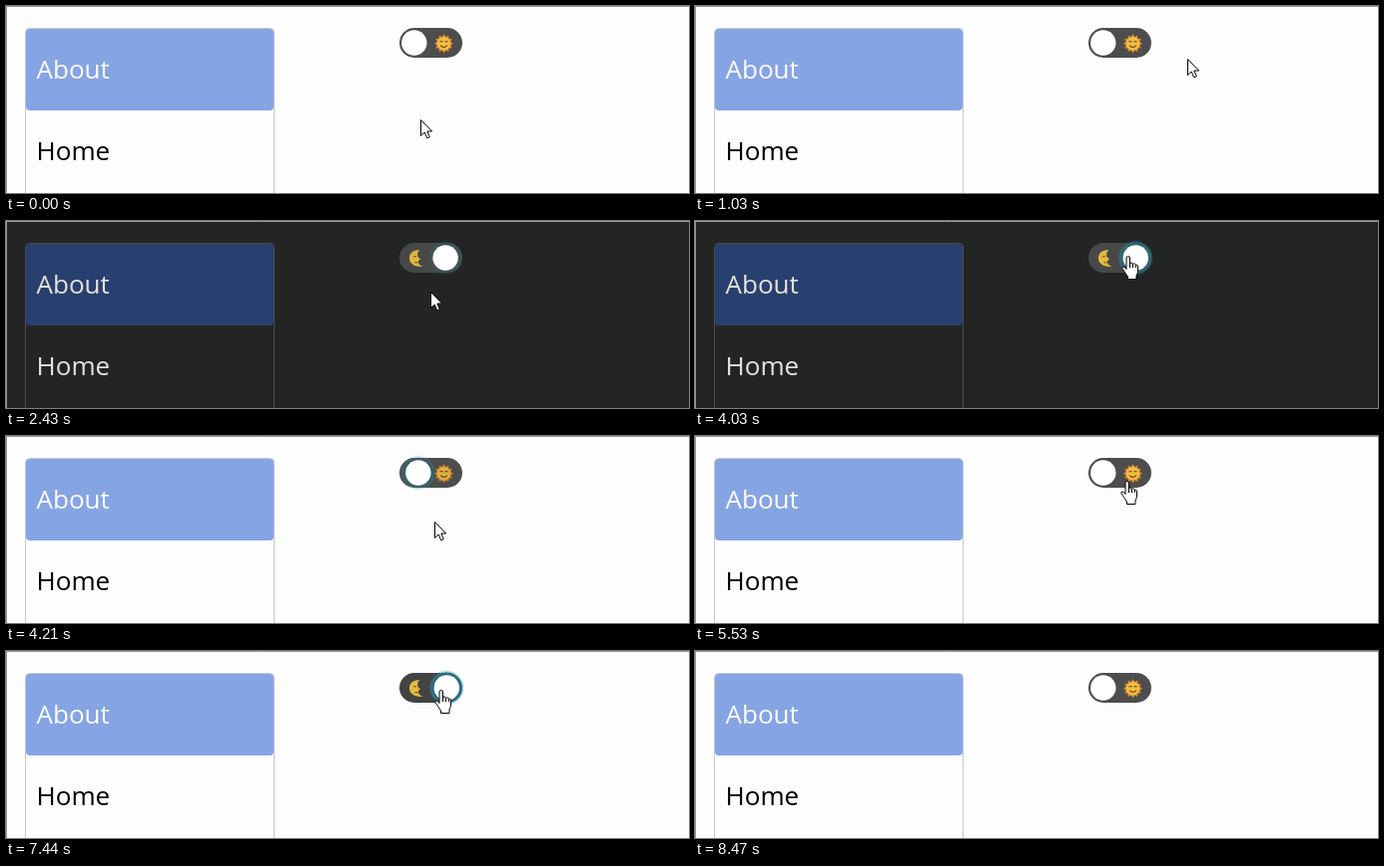
These frames come from a looping animation (684 px wide and 188 px high, 8.75 s). An HTML page:

```html
<!DOCTYPE html>
<html lang="en">
<head>
<meta charset="utf-8">
<title>Theme toggle</title>
<style>
  html, body { margin: 0; width: 100%; height: 100%; overflow: hidden; background: #fdfdfd; }
  svg { display: block; }
  text { font: 26px "Open Sans", "Noto Sans", sans-serif; }
</style>
</head>
<body>
<svg width="684" height="188" viewBox="0 0 684 188">
  <defs>
    <filter id="soft" x="-30%" y="-30%" width="160%" height="160%"><feGaussianBlur stdDeviation="1"/></filter>
  </defs>
  <rect id="page" width="684" height="188"/>
  <path d="M0 .5H684M.5 0V188" stroke="#969696"/>
  <rect id="list" x="19.5" y="22.5" width="249" height="200" rx="4" fill="none"/>
  <rect id="item" x="20" y="23" width="248" height="82" rx="4"/>
  <text id="about" x="30.5" y="73">About</text>
  <text id="home" x="30.5" y="155">Home</text>

  <rect id="track" x="394" y="22" width="63" height="30" rx="15"/>
  <g id="moon">
    <path d="M414.5 29C407 29 404 33 404 37.500S408 46.500 417.500 46C413.500 44 412.500 42 413 40L415 38.500L412.500 36C411.500 33 412.500 30.500 414.500 29Z" fill="#e3b93f"/>
    <path d="M408 35.500q1.500 1 2.800 0M409.500 41.500q1.500 1 3 0" fill="none" stroke="#5c4a22"/>
  </g>
  <g id="sun" transform="translate(438.500 37.700)">
    <path id="rays" fill="#e08a2c"/>
    <circle r="6.800" fill="#f2bd42"/>
    <path d="M-4-1.500q1.500-1.500 3 0M1-1.500q1.500-1.500 3 0M-3.500 2q3.500 3.500 7 0" fill="none" stroke="#66431f" stroke-width="1.100"/>
  </g>
  <g id="knob">
    <g id="ring" fill="none">
      <circle r="14.500" stroke="#3594ac" stroke-width="3" filter="url(#soft)"/>
      <circle r="14" stroke="#2b6c7c" stroke-width="2.500"/>
    </g>
    <circle r="12.700" fill="#fff"/>
  </g>

  <g id="cursor" fill="#fff" stroke="#000" stroke-linejoin="round">
    <path id="arrow" d="M.5.5V16.500L4.200 13L6.700 18.800L9.300 17.700L6.900 12H11.700Z"/>
    <g id="hand" transform="translate(-7 0)">
      <path d="M5 2Q5 .5 6.750.5T8.500 2V8Q8.500 6.800 10 7T11.500 8.500Q12 7.500 13.200 7.900T14.300 9.300Q15 8.700 15.800 9.200T16.500 11V15Q16.500 17.500 15 20V23.500H6.500V21Q5 19 3.500 16.500T.8 12.500Q.6 11 2 11T5 13.500Z"/>
      <path d="M8.500 8V12M11.500 8.500V12M14.300 9.300V12" fill="none"/>
    </g>
  </g>
</svg>
<script>
const LOOP = 8750, TICK = 60;
const $ = id => document.getElementById(id);
const set = (id, attrs) => { for (const k in attrs) $(id).setAttribute(k, attrs[k]); };
const lerp = (a, b, p) => a + (b - a) * p;
const between = (a, b, p) => [lerp(a[0], b[0], p), lerp(a[1], b[1], p)];
const easeOut = p => 1 - (1 - p) ** 2;

const light = { page: '#fdfdfd', line: '#c6c6c6', item: '#84a4e4', about: '#fdfdfd', home: '#000', off: '#4d4d4d', on: '#424443' };
const dark = { page: '#232524', line: '#4a4d4c', item: '#28406f', about: '#e6e2da', home: '#e6e2da', off: '#464948', on: '#464948' };

// The pointer circles the switch twice before settling on it.
const swirl = [[415, 114], [362, 90], [348, 45], [385, 8], [440, 1], [488, 25], [492, 55], [450, 73],
  [400, 68], [391, 35], [420, 4], [465, 4], [486, 30], [470, 62], [434, 35]];

// Each visit: click time, tick count, pointer on the switch, pointer after leaving, return time.
const visits = [
  { at: 2250, n: 5, from: [434, 35], to: [424, 75], back: 3420 },
  { at: 4030, n: 6, from: [434, 35], to: [427, 103], back: 5230 },
  { at: 5780, n: 6, from: [433, 45], to: [432, 89], back: 6640 },
  { at: 7380, n: 7, from: [436, 39], to: [448, 104], back: 8170 }
];

function spline(pts, p) {
  const u = p * (pts.length - 1), i = Math.min(Math.floor(u), pts.length - 2), f = u - i;
  const pt = k => pts[Math.max(0, Math.min(pts.length - 1, k))];
  return [0, 1].map(d => {
    const [a, b, c, e] = [pt(i - 1)[d], pt(i)[d], pt(i + 1)[d], pt(i + 2)[d]];
    return b + f * (c - a + f * (2 * a - 5 * b + 4 * c - e + f * (3 * (b - c) + e - a))) / 2;
  });
}

// Number of ticks shown since start, from 0 to n.
const ticks = (t, start, n, len = TICK) =>
  Math.max(0, Math.min(n, Math.floor((t - start) / len + 1e-6) + 1));

function pose(t) {
  const walk = ticks(t, 430, 15) + ticks(t, 1330, 11, 64);
  const s = { dark: false, on: 0, ring: 0, pos: spline(swirl, walk / 26) };
  visits.forEach((v, i) => {
    const k = ticks(t, v.at, v.n);
    if (!k) return;
    const q = Math.max(0, (k - 2) / (v.n - 2)), goal = i % 2 ? 0 : 1;
    s.dark = k > 1 ? goal === 1 : goal === 0;
    s.on = lerp(1 - goal, goal, 1 - (1 - q) ** 3);
    s.ring = 1 - q;
    s.pos = between(v.from, v.to, easeOut(q));
    const r = ticks(t, v.back, 6) / 6, next = visits[i + 1];
    if (r) s.pos = next ? between(v.to, next.from, easeOut(r)) : between(v.to, [622, 192], r);
  });
  return s;
}

function draw(t) {
  const s = pose(t), c = s.dark ? dark : light, [x, y] = s.pos.map(Math.round);
  set('page', { fill: c.page });
  set('list', { stroke: c.line });
  set('item', { fill: c.item });
  set('about', { fill: c.about });
  set('home', { fill: c.home });
  set('track', { fill: s.on > .5 ? c.on : c.off });
  set('moon', { opacity: s.on });
  set('sun', { opacity: 1 - s.on });
  set('knob', { transform: `translate(${lerp(408.8, 441.3, s.on)} 37)` });
  set('ring', { opacity: s.ring * (s.dark ? .8 : 1) });
  const over = x >= 394 && x <= 457 && y >= 22 && y <= 52;
  set('cursor', { transform: `translate(${x} ${y})` });
  set('arrow', { visibility: over ? 'hidden' : 'visible' });
  set('hand', { visibility: over ? 'visible' : 'hidden' });
}

const star = Array.from({ length: 24 }, (_, i) => {
  const a = i * Math.PI / 12, r = i % 2 ? 7 : 9.6;
  return (r * Math.sin(a)).toFixed(1) + ' ' + (-r * Math.cos(a)).toFixed(1);
});
set('rays', { d: 'M' + star.join('L') + 'Z' });

function frame() {
  draw(performance.now() % LOOP);
  requestAnimationFrame(frame);
}
frame();
</script>
</body>
</html>
```
